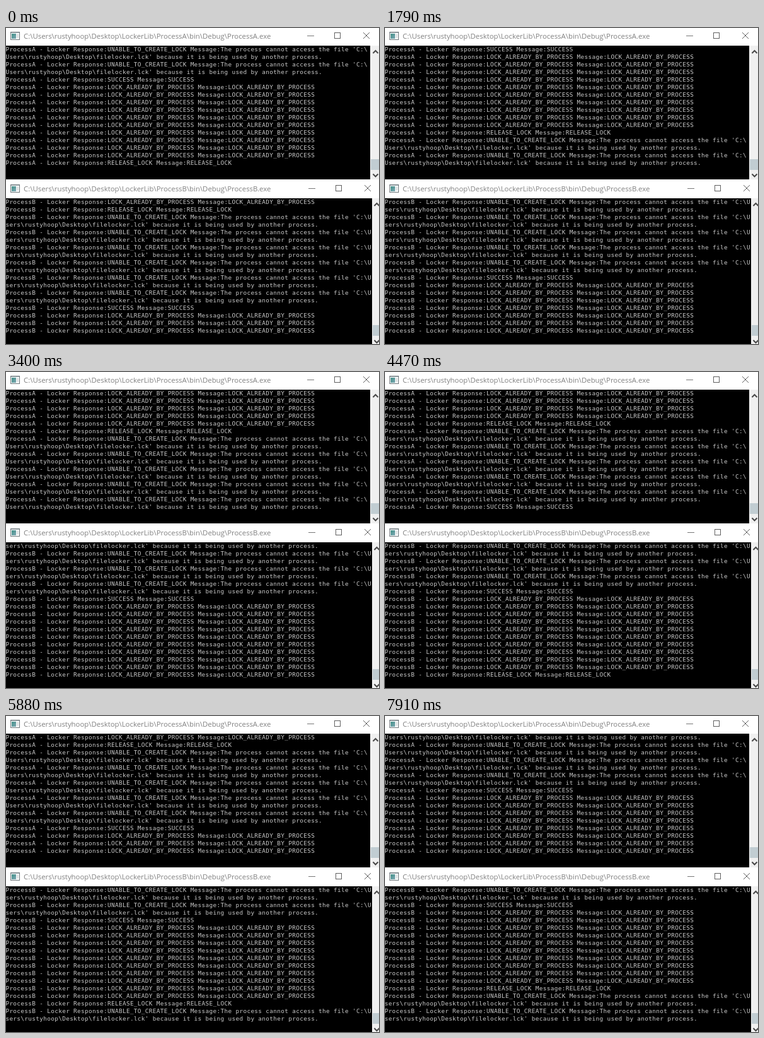
Recreate the animation shown at these times as an HTML page. Size 592 by 501 pixels, loop 8000 ms.

```html
<!DOCTYPE html>
<html lang="en">
<head>
<meta charset="utf-8">
<title>Locker consoles</title>
<style>
  html, body { margin: 0; width: 100%; height: 100%; overflow: hidden; background: #fff; }
  #stage { display: block; width: 592px; height: 501px; }
  .title { font: 11.4px "Open Sans", sans-serif; fill: #828282; }
  .log {
    font: 9.4px "DejaVu Sans Mono", monospace; letter-spacing: .34px;
    fill: #c8c8c8; animation: 8s step-end infinite;
  }
  #logA { animation-name: scrollA; }
  #logB { animation-name: scrollB; }
  .line { fill: none; stroke: #606060; }
  .bar { fill: #f0f0f0; }
  .thumb { fill: #c1cdd2; }
  .arrow { fill: none; stroke: #484848; stroke-width: 2; }

  /* one row is 12px */
  @keyframes scrollA {
    0% { transform: translateY(0); }
    0.875% { transform: translateY(-24px); }
    14.5% { transform: translateY(-48px); }
    26.125% { transform: translateY(-72px); }
    30% { transform: translateY(-96px); }
    42.5% { transform: translateY(-120px); }
    55.875% { transform: translateY(-132px); }
    56.875% { transform: translateY(-144px); }
    61.875% { transform: translateY(-156px); }
    68.75% { transform: translateY(-168px); }
    76.375% { transform: translateY(-180px); }
    79.25% { transform: translateY(-192px); }
    90.875% { transform: translateY(-204px); }
    96.75% { transform: translateY(-216px); }
    98.875%, 100% { transform: translateY(-228px); }
  }
  @keyframes scrollB {
    0% { transform: translateY(0); }
    1.875% { transform: translateY(-12px); }
    9.5% { transform: translateY(-24px); }
    14.5% { transform: translateY(-36px); }
    22.375% { transform: translateY(-48px); }
    29% { transform: translateY(-60px); }
    35.75% { transform: translateY(-72px); }
    41.5% { transform: translateY(-84px); }
    48.25% { transform: translateY(-96px); }
    73.5% { transform: translateY(-120px); }
    93%, 100% { transform: translateY(-144px); }
  }
</style>
</head>
<body>
<svg id="stage" viewBox="0 0 592 501">
  <defs>
    <linearGradient id="teal" x2="1" y2="1">
      <stop stop-color="#3f8f86"/>
      <stop offset="1" stop-color="#7fa9b4"/>
    </linearGradient>
    <g id="icon">
      <rect x=".5" y=".5" width="14" height="12" fill="#f7f9f9" stroke="#70797d"/>
      <path d="M1 1.5h13" stroke="#a9b4b9"/>
      <rect x="2" y="3" width="7" height="8" fill="url(#teal)"/>
      <path d="M10 4.5h3M10 6.5h3M10 8.5h3" stroke="#c9d0d3"/>
    </g>
    <g id="buttons" class="line">
      <path d="M0 5.5h11" stroke="#777"/>
      <rect x="43.5" y=".5" width="9" height="9"/>
      <path d="M89 0l10 10M99 0l-10 10"/>
    </g>
    <path id="up" class="arrow" d="M-4 2.5L0 -1.5L4 2.5"/>
    <path id="down" class="arrow" d="M-4 -2.5L0 1.5L4 -2.5"/>
  </defs>

  <rect width="592" height="501" fill="#fff"/>

  <use href="#icon" x="7" y="6"/>
  <text class="title" x="28" y="17">C:\Users\rustyhoop\Desktop\LockerLib\ProcessA\bin\Debug\ProcessA.exe</text>
  <use href="#buttons" x="478" y="7"/>
  <rect y="28" width="578" height="212"/>
  <rect class="bar" x="578" y="28" width="14" height="212"/>
  <rect class="thumb" x="579" y="208" width="13" height="17"/>
  <use href="#up" x="586.5" y="37.5"/>
  <use href="#down" x="586.5" y="234"/>
  <svg y="28" width="578" height="192"><g id="logA" class="log"></g></svg>

  <use href="#icon" x="7" y="248"/>
  <text class="title" x="28" y="259">C:\Users\rustyhoop\Desktop\LockerLib\ProcessB\bin\Debug\ProcessB.exe</text>
  <use href="#buttons" x="480" y="249"/>
  <rect y="270" width="581" height="231"/>
  <rect class="bar" x="581" y="270" width="11" height="231"/>
  <rect class="thumb" x="582" y="471" width="10" height="17"/>
  <use href="#up" x="588.5" y="279.5"/>
  <use href="#down" x="588.5" y="497.5"/>
  <svg y="270" width="581" height="216"><g id="logB" class="log"></g></svg>
</svg>
<script>
  const ROW = 12, BASELINE = 9, LEFT = -0.6;
  const same = code => [code, code];
  const replies = {
    L: same('LOCK_ALREADY_BY_PROCESS'),
    R: same('RELEASE_LOCK'),
    S: same('SUCCESS'),
    U: ['UNABLE_TO_CREATE_LOCK',
        "The process cannot access the file 'C:\\Users\\rustyhoop\\Desktop\\filelocker.lck' " +
        'because it is being used by another process.']
  };

  // Prints one reply per letter, wrapped at the console width.
  function print(name, cols, sequence) {
    const log = document.getElementById('log' + name);
    let row = 0;
    for (const key of sequence) {
      const [code, message] = replies[key];
      const entry = `Process${name} - Locker Response:${code} Message:${message}`;
      for (let i = 0; i < entry.length; i += cols) {
        const text = document.createElementNS('http://www.w3.org/2000/svg', 'text');
        text.setAttribute('x', LEFT);
        text.setAttribute('y', BASELINE + ROW * row++);
        text.textContent = entry.slice(i, i + cols);
        log.append(text);
      }
    }
  }

  const held = 'S' + 'L'.repeat(10) + 'R';
  print('A', 96, 'UU' + held + 'UUUUU' + 'S' + 'L'.repeat(8));
  print('B', 97, 'LR' + 'UUUUUU' + held + 'UU');
</script>
</body>
</html>
```
